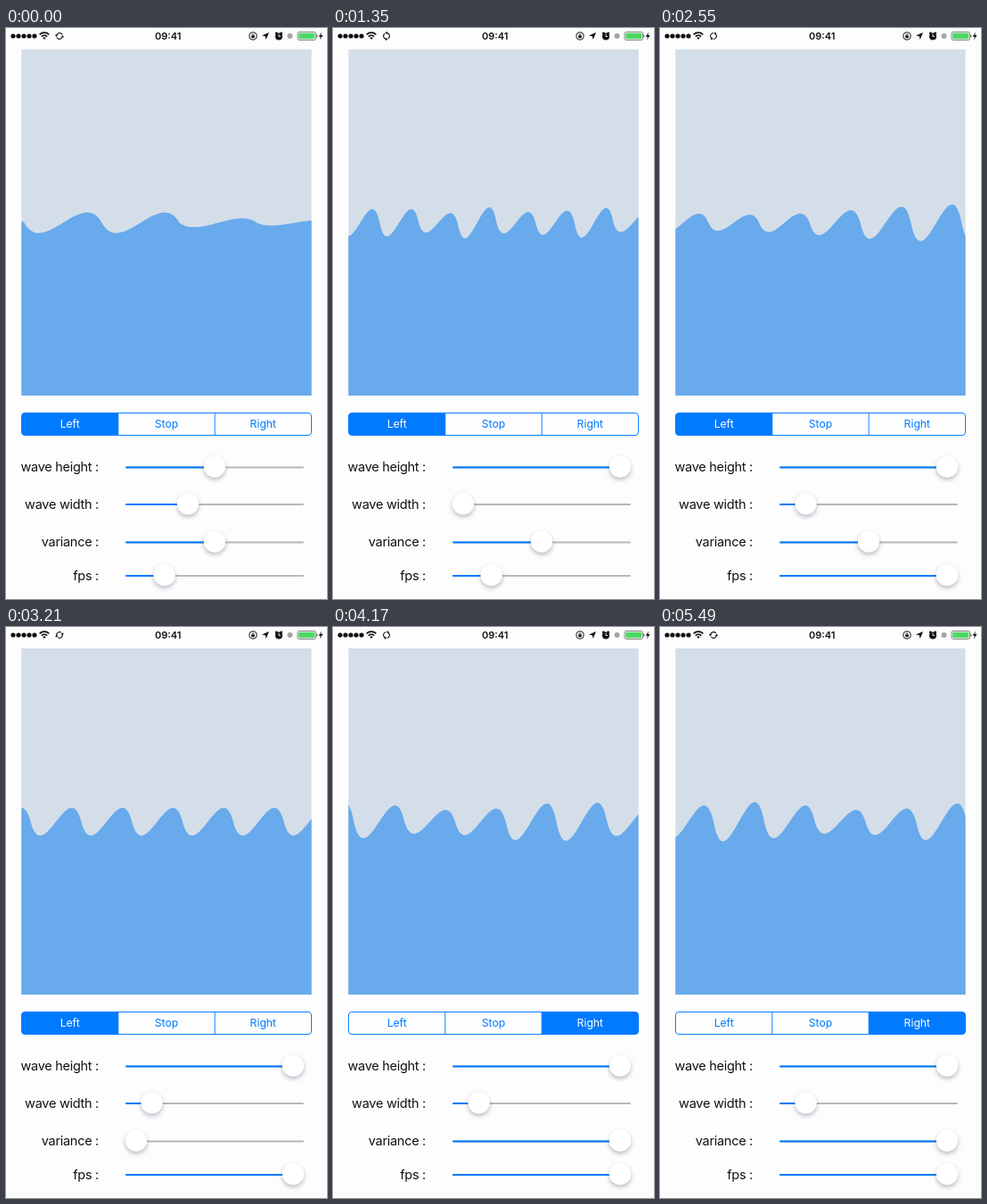
Recreate the animation shown at these times as an HTML page with a canvas. Size 360 by 640 pixels, loop 5520 ms.

```html
<!DOCTYPE html>
<html lang="en">
<head>
<meta charset="utf-8">
<title>Wave controls</title>
<style>
  html, body { margin: 0; width: 360px; height: 640px; overflow: hidden; background: #fdfdfe; }
  canvas { display: block; width: 360px; height: 640px; }
</style>
</head>
<body>
<canvas id="stage"></canvas>
<script>
const LOOP = 5520, STEP = 30;
const BLUE = '#007aff', INK = '#111', PAPER = '#fdfdfe';
const SKY = '#d4dee9', WATER = '#68aaeb', TRACK = '#b8b8ba';
const BOX = { x: 17.3, y: 24, w: 325.3, h: 388 };
const LEVEL = 218.3;

const canvas = document.getElementById('stage');
const c = canvas.getContext('2d');
const ratio = window.devicePixelRatio || 1;
canvas.width = 360 * ratio;
canvas.height = 640 * ratio;

// Slider gestures: each eases its slider to a new value
const initial = { height: .5, width: .33, variance: .5, fps: .18 };
const drags = [
  { slider: 'height', start: 250, end: 700, to: 1 },
  { slider: 'width', start: 850, end: 1270, to: 0 },
  { slider: 'width', start: 1450, end: 1850, to: .1 },
  { slider: 'fps', start: 2190, end: 2540, to: 1 },
  { slider: 'variance', start: 2720, end: 3120, to: 0 },
  { slider: 'variance', start: 3260, end: 3620, to: 1 }
];
const turns = [3700, 4483, 4925];

// Uneven wave heights; each reshaping of the row brings the next ripple
const ripples = [
  { mean: 0, swing: 10, peak: .5, span: 4.4 },
  { mean: -3, swing: 7, peak: 4.1, span: 2.6 },
  { mean: -1, swing: 12, peak: 7.5, span: 9 },
  { mean: 2, swing: 4.5, peak: 4, span: 4.6 }
];

function progress({ start, end }, t) {
  const u = Math.min(1, Math.max(0, (t - start) / (end - start)));
  return u * u * (3 - 2 * u);
}

function value(slider, t) {
  return drags.filter(d => d.slider === slider)
    .reduce((v, d) => v + (d.to - v) * progress(d, t), initial[slider]);
}

const movesRight = t => turns.filter(turn => t >= turn).length % 2 === 1;

// The water advances a fixed distance for every tick of the fps slider
function scroll(t) {
  let x = 20.5;
  for (let s = 0; s < t; s += 10) {
    const speed = .2125 * (1 + 59 * value('fps', s + 5)) / 60;
    x += speed * Math.min(10, t - s) * (movesRight(s + 5) ? 1 : -1);
  }
  return x;
}

function unevenness(i, t) {
  const mix = progress(drags[1], t) + progress(drags[2], t) + (t >= drags[5].start);
  const dev = ({ mean, swing, peak, span }) => mean + swing * Math.cos(2 * Math.PI * (i - peak) / span);
  const k = Math.floor(mix);
  const a = dev(ripples[k]), b = dev(ripples[Math.min(k + 1, 3)]);
  return a + (b - a) * (mix - k);
}

function rect(x, y, w, h, color, r = 0) {
  c.fillStyle = color;
  c.beginPath();
  c.roundRect(x, y, w, h, r);
  c.fill();
}

function disc(x, y, r, color) {
  c.fillStyle = color;
  c.beginPath();
  c.arc(x, y, r, 0, 7);
  c.fill();
}

function arc(x, y, r, from, to, w) {
  c.lineWidth = w;
  c.beginPath();
  c.arc(x, y, r, from, to);
  c.stroke();
}

function poly(color, ...p) {
  c.fillStyle = color;
  c.beginPath();
  for (let i = 0; i < p.length; i += 2) c.lineTo(p[i], p[i + 1]);
  c.fill();
}

function label(text, x, y, font, color, align, spacing = 0) {
  c.font = font + ' Inter, Roboto, sans-serif';
  c.fillStyle = color;
  c.textAlign = align;
  c.letterSpacing = spacing + 'px';
  c.fillText(text, x, y);
}

function drawStatus(t) {
  c.strokeStyle = INK;
  for (let i = 0; i < 5; i++) disc(8 + i * 6, 9, 2.6, INK);

  const up = -Math.PI / 2, spread = .75;
  for (const r of [4.6, 7.8]) arc(43, 13, r, up - spread, up + spread, 1.7);
  c.fillStyle = INK;
  c.beginPath();
  c.moveTo(43, 13);
  c.arc(43, 13, 2.6, up - spread, up + spread);
  c.fill();

  c.save();
  c.translate(60, 9);
  c.rotate(t / LOOP * 10 * Math.PI);
  for (let i = 0; i < 2; i++) {
    arc(0, 0, 3.4, .35, 2.7, 1.1);
    poly(INK, 1.7, 1.4, 5, 1.5, 3.6, -1);
    c.rotate(Math.PI);
  }
  c.restore();

  label('09:41', 181.7, 13, '600 11px', INK, 'center');

  arc(277, 9, 4.1, 0, 7, 1);
  rect(275.2, 8.4, 3.6, 2.8, INK);
  arc(277, 8.3, 1.2, Math.PI, 0, .8);
  poly(INK, 295, 5, 291.7, 13, 290.8, 9.3, 287, 8.5);

  disc(303.3, 6, 1.4, INK);
  disc(308.7, 6, 1.4, INK);
  disc(306, 9.4, 4, INK);
  c.strokeStyle = PAPER;
  c.lineWidth = .9;
  c.beginPath();
  c.moveTo(306, 6.8); c.lineTo(306, 9.5); c.lineTo(308, 9.5);
  c.stroke();

  disc(318.5, 9, 3, '#a5a5a5');

  c.strokeStyle = '#666';
  c.lineWidth = .8;
  c.beginPath();
  c.roundRect(327, 4.5, 20.5, 9, 1.8);
  c.stroke();
  rect(328.2, 5.7, 18.1, 6.6, '#4cd964', .8);
  rect(348.2, 7.4, 1.2, 3.2, '#666', .6);
  poly(INK, 354, 4.5, 350.7, 9.7, 352.9, 9.7, 351.8, 13.5, 355.5, 8, 353.2, 8);
}

function drawWaves(t) {
  const { x: left, y: top, w, h } = BOX;
  const right = left + w, bottom = top + h;
  const period = 43.7 + 131 * value('width', t);
  const base = 15.5 * value('height', t);
  const variance = value('variance', t);
  const origin = scroll(t);

  rect(left, top, w, h, SKY);
  c.save();
  c.beginPath();
  c.rect(left, top, w, h);
  c.clip();
  c.fillStyle = WATER;
  c.beginPath();
  let i = Math.floor((left - origin) / period);
  let x = origin + i * period;
  c.moveTo(x, bottom);
  c.lineTo(x, LEVEL);
  for (; x < right; i++, x += period) {
    const pull = (base + variance * unevenness(i, t)) * 2 * Math.sqrt(3);
    c.bezierCurveTo(x + period * .25, LEVEL + pull, x + period * .75, LEVEL - pull, x + period, LEVEL);
  }
  c.lineTo(x, bottom);
  c.fill();
  c.restore();
}

function drawTabs(t) {
  const chosen = movesRight(t) ? 2 : 0;
  const x0 = 17.5, y = 431.5, w = 325, h = 25, part = w / 3;
  c.save();
  c.beginPath();
  c.roundRect(x0, y, w, h, 3.5);
  c.clip();
  rect(x0 + chosen * part, y, part, h, BLUE);
  c.restore();

  c.strokeStyle = BLUE;
  c.lineWidth = .95;
  c.beginPath();
  c.roundRect(x0, y, w, h, 3.5);
  for (const i of [1, 2]) {
    c.moveTo(x0 + i * part, y);
    c.lineTo(x0 + i * part, y + h);
  }
  c.stroke();
  ['Left', 'Stop', 'Right'].forEach((name, i) =>
    label(name, x0 + (i + .5) * part, 448.2, '12.2px', i === chosen ? '#fff' : BLUE, 'center'));
}

function drawSlider(name, y, v) {
  const x = 146 + 176 * v;
  label(name + ' :', 104, y + 4.7, '14.5px', INK, 'right', -.28);
  rect(134, y - 1, 200, 2, TRACK, 1);
  rect(134, y - 1, x - 134, 2, BLUE, 1);
  c.save();
  c.shadowColor = 'rgba(50, 45, 70, .32)';
  c.shadowBlur = 5 * ratio;
  c.shadowOffsetY = 2.5 * ratio;
  disc(x, y - .7, 12.2, '#fff');
  c.restore();
}

function draw(t) {
  c.setTransform(ratio, 0, 0, ratio, 0, 0);
  rect(0, 0, 360, 640, PAPER);
  drawStatus(t);
  drawWaves(t);
  drawTabs(t);
  drawSlider('wave height', 492.4, value('height', t));
  drawSlider('wave width', 534, value('width', t));
  drawSlider('variance', 576.4, value('variance', t));
  drawSlider('fps', 613.9, value('fps', t));
}

const start = performance.now();
function tick() {
  const t = (performance.now() - start) % LOOP;
  draw(Math.floor(t / STEP) * STEP);
  requestAnimationFrame(tick);
}
tick();
</script>
</body>
</html>
```
